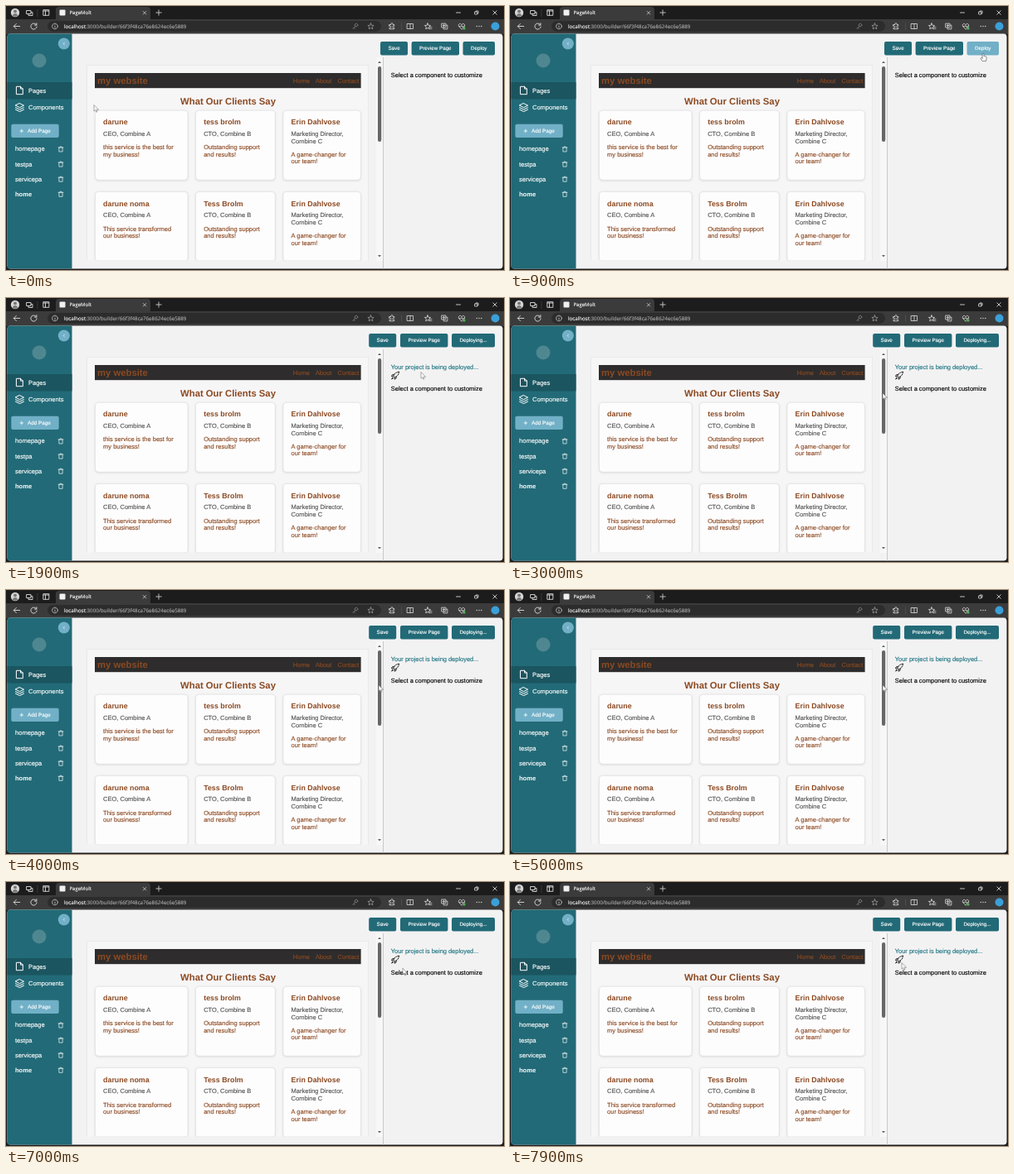
These frames come from a looping animation (600x319 px, 8 s). An HTML page with a canvas:

```html
<!DOCTYPE html>
<html lang="en">
<head>
<meta charset="utf-8">
<title>Page builder</title>
<style>
html, body { margin: 0; width: 100%; height: 100%; overflow: hidden; background: #1c1c1c; }
canvas { display: block; width: 600px; height: 319px; }
</style>
</head>
<body>
<canvas id="stage" width="600" height="319"></canvas>
<script>
const c = document.getElementById('stage').getContext('2d');
const LOOP = 8000, CLICK = 1000;
const SANS = '"Liberation Sans", Arial, sans-serif';
const UI = '"Open Sans", "Noto Sans", sans-serif';
const TEAL = '#226a77', LIGHT = '#71b0c7', BROWN = '#8b4a22', PAGE = '#f3f2f3';

// pointer path: time, x, y of the tip
const PATH = [
  [0, 106, 120], [150, 106, 120], [800, 570, 57], [1600, 570, 57],
  [1800, 546, 59], [1900, 500, 90], [2450, 449, 115], [5150, 449, 115],
  [5700, 475, 98], [6350, 475, 98], [6800, 478, 105], [7250, 478, 104],
  [7650, 472, 98], [8000, 472, 98]
];

function rect(x, y, w, h, fill) {
  c.fillStyle = fill;
  c.fillRect(x, y, w, h);
}

function round(x, y, w, h, r, fill, stroke) {
  c.beginPath();
  c.roundRect(x, y, w, h, r);
  if (fill) { c.fillStyle = fill; c.fill(); }
  if (stroke) { c.strokeStyle = stroke; c.stroke(); }
}

function disc(x, y, r, fill) {
  c.beginPath();
  c.arc(x, y, r, 0, 7);
  c.fillStyle = fill;
  c.fill();
}

// a hairline stroke gives regular text the soft weight of scaled-down type
function text(s, x, y, size, fill, { bold = false, font = SANS, align = 'left' } = {}) {
  c.font = `${bold ? 'bold ' : ''}${size}px ${font}`;
  c.textRendering = 'geometricPrecision';
  c.textAlign = align;
  c.fillStyle = c.strokeStyle = fill;
  c.fillText(s, x, y);
  if (!bold) {
    c.lineWidth = 0.15;
    c.strokeText(s, x, y);
  }
}

function icon(x, y, d, color, width = 0.9, fill) {
  const p = new Path2D(d);
  c.save();
  c.translate(x, y);
  c.lineWidth = width;
  c.lineJoin = c.lineCap = 'round';
  if (fill) { c.fillStyle = fill; c.fill(p); }
  if (color) { c.strokeStyle = color; c.stroke(p); }
  c.restore();
}

const STAR = 'M0 -3.6L1 -1.2L3.6 -1L1.7 .8L2.3 3.3L0 2L-2.3 3.3L-1.7 .8L-3.6 -1L-1 -1.2Z';

function browser() {
  rect(0, 0, 600, 319, '#1c1c1c');
  round(60, 1, 114, 18, [4, 4, 0, 0], '#3b3b3b');
  rect(0, 16, 600, 18, '#3b3b3b');
  round(50, 18, 402, 13, 6.5, '#2c2c2c');

  disc(11, 8, 5.2, '#d4d4d4');
  disc(11, 6.4, 1.9, '#777');
  icon(11, 8, 'M-3.4 3.4Q0 -1.2 3.4 3.4Q0 6 -3.4 3.4Z', null, 1, '#777');
  icon(28, 8, 'M-3 -2.5H2V1.5H-3ZM-1 1.5V3.5H4V-.5H2', '#ddd');
  rect(37.5, 4, 0.7, 9, '#444');
  icon(48.5, 8, 'M-3.3 -3.3H3.3V3.3H-3.3ZM-3.3 -2H3.3M-1 -2V3.3', '#ddd');
  round(64.5, 4.5, 7, 7, 1, '#f0f0f0');
  text('PageMolt', 76.5, 10.2, 6, '#f4f4f4', { font: UI });
  icon(167, 8.3, 'M-1.8 -1.8L1.8 1.8M1.8 -1.8L-1.8 1.8', '#ccc', 0.8);
  icon(184, 8, 'M-3.2 0H3.2M0 -3.2V3.2', '#ddd', 0.8);
  icon(545, 8, 'M-2.5 0H2.5', '#eee', 0.8);
  icon(567, 8, 'M-2 -1H1V2H-2ZM-1 -1V-2H2V1H1', '#eee', 0.7);
  icon(589, 8, 'M-2.2 -2.2L2.2 2.2M2.2 -2.2L-2.2 2.2', '#eee', 0.8);

  icon(13, 24.5, 'M3.7 0H-3.7M-.6 -3.1L-3.7 0L-.6 3.1', '#ddd');
  icon(33.5, 24.5, 'M3.2 -1.6A3.6 3.6 0 1 0 3.6 .4M3.4 -3.8V-1.4H1', '#ddd');
  icon(59, 24.5, 'M3.4 0A3.4 3.4 0 1 1 3.4 -.01M0 -.2V1.7M0 -1.7V-1.6', '#ccc', 0.8);
  const host = 'localhost', opt = { font: UI };
  text(host, 70, 26.9, 6.2, '#f2f2f2', opt);
  text(':3000/builder/66f3f48ca76e8624ec6e5889', 70 + c.measureText(host).width, 26.9, 6.2, '#a5a5a5', opt);
  icon(421, 24.5, 'M2.8 -1.4A1.8 1.8 0 1 1 2.8 -1.41M-.1 0L-3 2.9M-2 1.9L-1 2.9', '#999', 0.7);
  icon(439.5, 24.5, STAR, '#aaa', 0.7);
  icon(465, 24.5, 'M-3 -2H-1A1.2 1.2 0 1 1 1 -2H2.7V-.2A1.2 1.2 0 1 0 2.7 1.7V3.3H-3V1.7A1.2 1.2 0 1 0 -3 -.2Z', '#ddd', 0.8);
  rect(476, 20, 0.7, 9, '#555');
  icon(487, 24.5, 'M-3.5 -3H3.5V3H-3.5ZM0 -3V3', '#ddd', 0.8);
  icon(508, 24.5, STAR, '#ddd', 0.8);
  icon(512, 26.5, 'M-1.4 -1H1M-1 1H1', '#ddd', 0.7);
  icon(528.5, 24.5, 'M-3.4 -3.4H1.4V1.4H-3.4ZM-1.4 1.4V3.4H3.4V-1.4H1.4M-1 -2.4V.4M-2.4 -1H.4', '#ddd', 0.8);
  icon(549, 24.5, 'M0 3.5L-3.3 .2C-5 -2.4 -1.6 -4.5 0 -1.8C1.6 -4.5 5 -2.4 3.3 .2ZM-3 .2H-1L0 -1L1 1.2L1.7 .2H3', '#ddd', 0.8);
  disc(552, 27, 1.7, '#4caf50');
  for (const x of [567.2, 570, 572.8]) disc(x, 24.5, 0.7, '#ddd');
  disc(589.5, 24.5, 5, '#3b9fd8');
}

function trash(y) {
  icon(66, y, 'M-2.9 -2H2.9M-1 -2V-3H1V-2M-2.1 -2V3H2.1V-2', '#dcebee', 0.8);
}

function sidebar() {
  rect(1, 33, 78.5, 285, TEAL);
  disc(69.8, 45.5, 7, LIGHT);
  icon(69.8, 45.5, 'M.6 -1.3L-.7 0L.6 1.3', '#fff', 0.7);
  disc(40, 66, 8.5, '#4f8791');
  rect(1, 92, 78.5, 20.5, '#1b5560');
  icon(16.5, 102, 'M-3.7 -4.7H1L3.8 -1.9V4.7H-3.7ZM1 -4.7V-1.9H3.8', '#fff', 1);
  text('Pages', 27, 104.8, 7.5, '#fff');
  icon(16.5, 122.5, 'M0 -4.8L5 -2.3L0 .2L-5 -2.3ZM-5 .2L0 2.7L5 .2M-5 2.6L0 5.1L5 2.6', '#fff', 1);
  text('Components', 27, 125.4, 7.5, '#fff');
  round(6.3, 142.7, 57.4, 16.4, 2, LIGHT);
  icon(18.8, 151, 'M-1.8 0H1.8M0 -1.8V1.8', '#fff', 0.8);
  text('Add Page', 26, 153.2, 6.3, '#fff');
  ['homepage', 'testpa', 'servicepa', 'home'].forEach((s, i) => {
    const y = 173 + i * 18.1;
    text(s, 11, y + 2.4, 7.55, '#fff', { bold: i === 3 });
    trash(y);
  });
}

function card(x, y, w, [name, role, quote]) {
  c.save();
  c.shadowColor = 'rgba(0,0,0,.15)';
  c.shadowBlur = 3;
  c.shadowOffsetY = 0.7;
  round(x, y, w, 84, 4, '#fefdfe');
  c.restore();
  c.lineWidth = 0.6;
  round(x, y, w, 84, 4, null, '#dedddd');
  let ty = y + 31;
  text(name, x + 9.6, y + 17.2, 8.85, BROWN, { bold: true });
  for (const s of role) { text(s, x + 9.6, ty, 7.5, '#555'); ty += 8.5; }
  ty += 7.6;
  for (const s of quote) { text(s, x + 9.6, ty, 7.5, BROWN); ty += 8.6; }
}

function preview() {
  c.save();
  c.beginPath();
  c.rect(97, 71, 341, 236.5);
  c.clip();
  rect(97, 71, 340, 240, '#f7f6f7');
  c.lineWidth = 1;
  c.strokeStyle = '#eae9ea';
  c.strokeRect(97.5, 71.5, 339, 250);
  rect(107, 81, 320.6, 18.2, '#2e2c2c');
  text('my website', 110, 93.8, 11.3, BROWN, { bold: true });
  text('Home', 345.8, 92.7, 7.5, BROWN);
  text('About', 372.8, 92.7, 7.5, BROWN);
  text('Contact', 399.6, 92.7, 7.5, BROWN);
  text('What Our Clients Say', 267.5, 118.5, 11.3, BROWN, { bold: true, align: 'center' });

  const praise = ['Outstanding support', 'and results!'];
  const third = ['Erin Dahlvose', ['Marketing Director,', 'Combine C'], ['A game-changer for', 'our team!']];
  const ceo = ['CEO, Combine A'], cto = ['CTO, Combine B'];
  const rows = [
    [['darune', ceo, ['this service is the best for', 'my business!']], ['tess brolm', cto, praise], third],
    [['darune noma', ceo, ['This service transformed', 'our business!']], ['Tess Brolm', cto, praise], third]
  ];
  rows.forEach((row, i) => {
    const y = 126.2 + i * 98.2;
    card(107.5, y, 111.5, row[0]);
    card(228.6, y, 95.6, row[1]);
    card(334, y, 93.4, row[2]);
  });
  c.restore();

  rect(446, 62, 8, 246, '#f8f7f8');
  icon(450, 68, 'M-2 1L0 -1.2L2 1Z', null, 1, '#606060');
  icon(450, 302, 'M-2 -1L0 1.2L2 -1Z', null, 1, '#606060');
  round(448, 73, 4.2, 91, 2.1, '#666');
  rect(454, 62, 0.9, 256, '#c4c4c4');
}

function button(label, x, w, fill = TEAL) {
  round(x, 43, w, 16.6, 2, fill);
  text(label, x + w / 2, 53.4, 6.25, '#fff', { align: 'center' });
}

function rocket(y) {
  icon(469, y, 'M4.4 -4.4C1.4 -4.4 -.8 -2.6 -2.2 .4L-.4 2.2C2.6 .8 4.4 -1.4 4.4 -4.4ZM-1.2 -1.4L-3.6 -1L-4.6 1L-2.2 .4M1.4 1.2L1 3.6L-1 4.6L-.4 2.2M-2.9 1.8L-4.4 4.4L-1.8 2.9', '#111', 0.8);
}

function panel(t, hover) {
  const sent = t >= CLICK;
  button('Save', sent ? 437.2 : 451, 33);
  button('Preview Page', sent ? 475 : 488.6, 57.4);
  if (sent) button('Deploying...', 537, 52, hover ? LIGHT : TEAL);
  else button('Deploy', 550.5, 38.5, hover ? LIGHT : TEAL);
  if (sent) {
    text('Your project is being deployed...', 463.8, 86.2, 7.45, '#1f7683');
    rocket(93.7 - 0.5 * (1 - Math.cos(t * Math.PI / 500)) / 2);
  }
  text('Select a component to customize', 463.8, sent ? 112.3 : 86.2, 7.47, '#000');
}

function pointerAt(t) {
  let i = 1;
  while (i < PATH.length - 1 && t >= PATH[i][0]) i++;
  const [t0, x0, y0] = PATH[i - 1], [t1, x1, y1] = PATH[i];
  const k = Math.min(1, (t - t0) / (t1 - t0));
  const e = k * k * (3 - 2 * k);
  return [x0 + (x1 - x0) * e, y0 + (y1 - y0) * e];
}

function pointer(x, y, hand) {
  if (hand) {
    icon(x, y, 'M-.9 5.4V.8Q0 -.4 .9 .8V3.6L3.6 4.2Q4.3 4.4 4.2 5.3L3.5 9.6H-.8L-3 6.4Q-2.8 4.8 -.9 6.2Z', '#444', 0.6, '#fff');
  } else {
    icon(x, y, 'M0 0V7.2L1.7 5.7L2.8 8.2L4 7.7L2.9 5.3H5.2Z', '#666', 0.55, '#fff');
  }
}

function draw(t) {
  browser();
  c.save();
  c.beginPath();
  c.roundRect(1.5, 33.6, 597, 283.9, 4);
  c.clip();
  rect(1, 33, 598, 285, PAGE);
  sidebar();
  preview();
  const [x, y] = pointerAt(t);
  const hover = x > (t < CLICK ? 550 : 537) && x < 589 && y > 43 && y < 60;
  panel(t, hover);
  c.restore();
  pointer(x, y, hover);
}

function tick(now) {
  draw(now % LOOP);
  requestAnimationFrame(tick);
}
draw(0);
requestAnimationFrame(tick);
</script>
</body>
</html>
```
